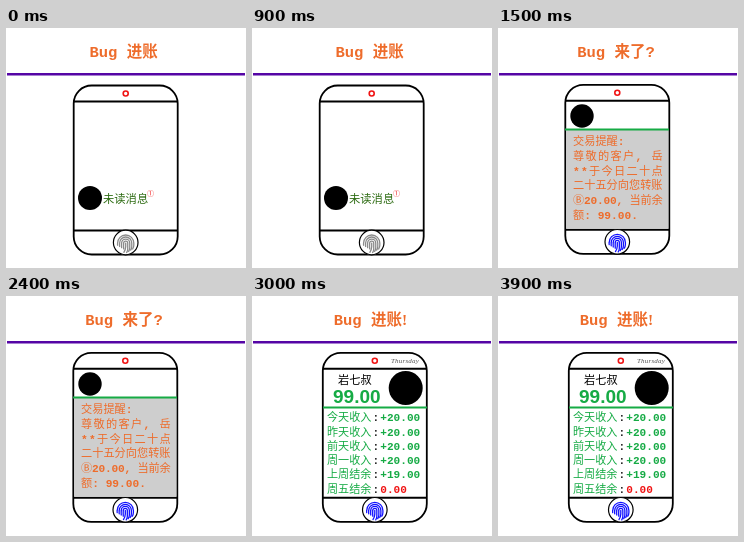
Animation of 240 by 240 pixels, one loop 4500 ms. Source, as an HTML page:

```html
<!DOCTYPE html>
<html lang="zh-CN">
<head>
<meta charset="utf-8">
<title>Bug 进账</title>
<style>
  html, body { margin: 0; width: 100%; height: 100%; overflow: hidden; background: #fff; }
  svg { display: block; width: 100vw; height: 100vh; }
  text { font-family: "Liberation Mono", "Noto Sans CJK SC", "Noto Sans CJK", monospace; white-space: pre; }
  .serif { font-family: "Liberation Serif", serif; }
  .sans { font-family: "Liberation Sans", sans-serif; }
  .b { font-weight: bold; }
</style>
</head>
<body>
<svg id="stage" viewBox="0 0 240 240"></svg>
<script>
const ORANGE = '#ee6c2b', GREEN = '#16ab45', RED = '#f01414', BLUE = '#1010ff';
const HOLD = 1500;

const text = (x, y, size, fill, body, extra = '') =>
  `<text x="${x}" y="${y}" font-size="${size}" fill="${fill}" ${extra}>${body}</text>`;
const bold = s => `<tspan class="b">${s}</tspan>`;
const rule = (x1, x2, y, color, w = 2) =>
  `<path d="M${x1} ${y}H${x2}" stroke="${color}" stroke-width="${w}"/>`;
const dot = (x, y, r) => `<circle cx="${x}" cy="${y}" r="${r}" fill="#000"/>`;

const title = (x, words) => text(x, 28.7, 15.5, ORANGE, 'Bug ' + words, 'class="b"');

// Nested ridges, drawn around (0, 0)
function fingerprint(x, y, color) {
  let d = 'M0 -1V3Q0 6 -2 9';
  for (let i = 1; i <= 4; i++) {
    const r = i * 2.2, low = 7.6 - i * 1.3;
    d += `M${-r} ${low - 1}Q${-r - .2} 1 ${-r} -1A${r} ${r} 0 0 1 ${r} -1V${low - 1}Q${r} ${low + 1} ${r - 1.2} ${low + 3}`;
  }
  return `<path transform="translate(${x} ${y}) scale(.92)" d="${d}" fill="none" stroke="${color}" stroke-width="1.4" stroke-linecap="round"/>`;
}

function phone(cx, top, printColor) {
  const l = cx - 52, r = cx + 52;
  return `<rect x="${l}" y="${top}" width="104" height="169" rx="18" fill="#fff" stroke="#000" stroke-width="1.8"/>`
    + rule(l, r, top + 16, '#000') + rule(l, r, top + 145, '#000')
    + `<circle cx="${cx}" cy="${top + 8}" r="2.5" fill="none" stroke="${RED}" stroke-width="1.6"/>`
    + `<circle cx="${cx}" cy="${top + 157}" r="12.3" fill="#fff" stroke="#000" stroke-width="1.2"/>`
    + fingerprint(cx, top + 158.5, printColor);
}

function unread() {
  return title(83.5, '进账') + phone(119.7, 57.5, '#8a8a8a')
    + dot(84, 170, 12)
    + text(97, 175, 11.3, '#2b6a10', '未读消息')
    + text(141, 167.5, 7, RED, '①', 'style="font-family:\'Noto Sans CJK SC\',sans-serif"');
}

function message() {
  // Each line with its letter spacing
  const lines = [
    ['交易提醒' + bold(':'), 0],
    ['尊敬的客户' + bold(', ') + '岳', 1.3],
    [bold('**') + '于今日二十点', 1.3],
    ['二十五分向您转账', 0],
    ['Ⓑ' + bold('20.00, ') + '当前余', -.2],
    ['额' + bold(': 99.00.'), 0]
  ];
  return title(79.2, '来了?') + phone(119.3, 56.8, BLUE)
    + dot(84, 88, 11.7)
    + '<rect x="68.2" y="102" width="102.2" height="98.8" fill="#cecece"/>'
    + rule(67, 171, 101.5, GREEN)
    + lines.map(([s, gap], i) =>
      text(75, 117 + i * 14.8, 11.2, ORANGE, s, `letter-spacing="${gap}"`)).join('');
}

function account() {
  const rows = [
    ['今天收入', '+20.00'], ['昨天收入', '+20.00'], ['前天收入', '+20.00'],
    ['周一收入', '+20.00'], ['上周结余', '+19.00'], ['周五结余', '0.00']
  ];
  const row = ([label, sum], i) => {
    const y = 125.2 + i * 14.3;
    return text(75, y, 11.1, GREEN, label)
      + text(120.6, y, 11.1, '#222', ':', 'class="b"')
      + text(128.3, y, 11.1, sum[0] === '+' ? GREEN : RED, sum, 'class="b"');
  };
  return title(81.7, '进账<tspan class="serif">!</tspan>') + phone(122.8, 56.8, BLUE)
    + text(139, 67, 7, '#555', 'Thursday', 'class="serif" font-style="italic" letter-spacing=".2"')
    + text(86, 88, 11.2, '#000', '岩七叔')
    + text(81, 106.5, 19, GREEN, '99.00', 'class="sans b"')
    + dot(153.7, 92, 17) + rule(71, 175, 111.5, GREEN)
    + rows.map(row).join('');
}

const stage = document.getElementById('stage');
const scenes = [unread, message, account];
stage.innerHTML = '<rect width="240" height="240" fill="#fff"/>' + rule(1, 239, 46.2, '#5505a5', 2.6)
  + scenes.map(s => `<g>${s()}</g>`).join('');
const groups = stage.querySelectorAll('g');

function draw(t) {
  const now = Math.floor(t / HOLD) % scenes.length;
  groups.forEach((g, i) => g.setAttribute('visibility', i === now ? 'visible' : 'hidden'));
}

const start = performance.now();
function tick() {
  draw(performance.now() - start);
  requestAnimationFrame(tick);
}
tick();
</script>
</body>
</html>
```
